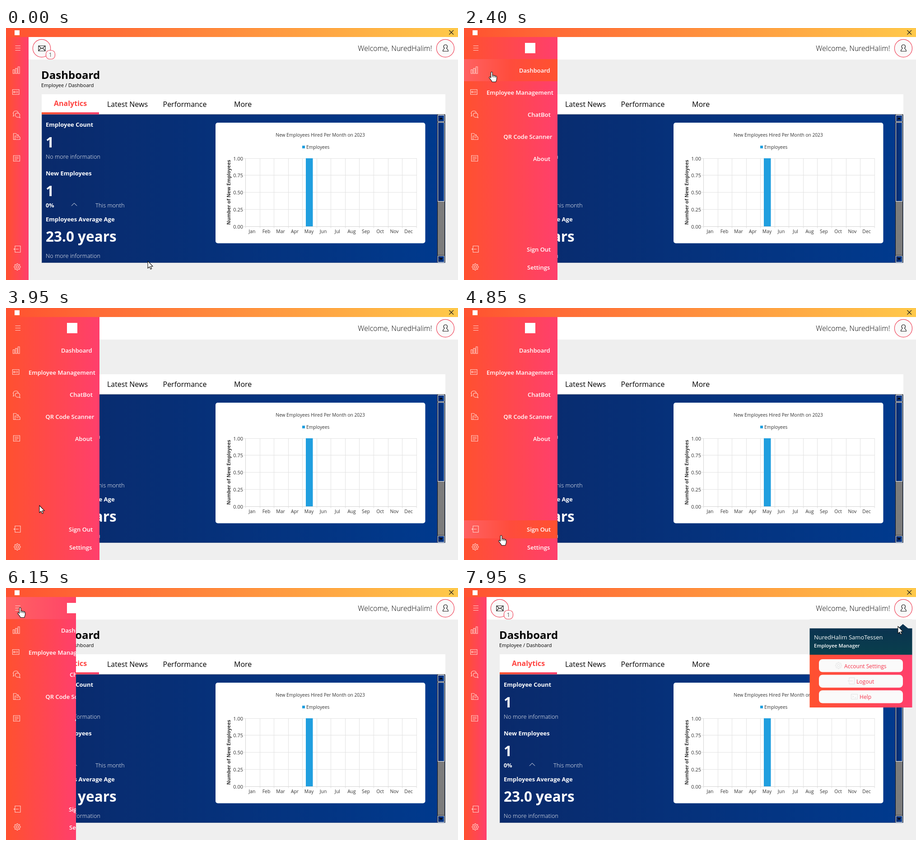
An HTML page for the animation above (8000 ms loop, 1001x559 px).

```html
<!DOCTYPE html>
<html lang="en">
<head>
<meta charset="utf-8">
<title>Dashboard</title>
<style>
  html, body { margin: 0; width: 100%; height: 100%; overflow: hidden; background: #efefef; }
  #stage { display: block; width: 1001px; height: 559px; }
  text { font-family: "Open Sans", "Noto Sans", sans-serif; white-space: pre; }
  .b { font-weight: 700; }
  .light { font-weight: 300; }
  .h { font-size: 13px; font-weight: 700; }
  .n { font-size: 31.5px; font-weight: 700; }
  .s { font-size: 12.8px; font-weight: 300; }
  .tab { font-size: 16px; }
  .menu text { font-size: 13px; font-weight: 600; fill: #fff; }
  .chart { font-size: 10.2px; fill: #333; }
  .icon { fill: none; stroke: #ffd3cc; stroke-width: 1.15; }
  .mid { text-anchor: middle; }
  .end { text-anchor: end; }
  .ring { fill: #fafafa; stroke: #f0455a; stroke-width: 1.2; }
  .dark { fill: none; stroke: #222; stroke-width: 1.2; }
  .faint { fill: none; stroke: #e2e2e2; }
  .scroll rect { fill: url(#knob); stroke: #fff; }
  .btn rect { fill: #fafafa; }
  .btn text { font-size: 12.1px; fill: #f5334a; }
</style>
</head>
<body>
<svg id="stage" viewBox="0 0 1001 559" xmlns="http://www.w3.org/2000/svg">
  <defs>
    <linearGradient id="bar"><stop stop-color="#ff5230"/><stop offset="1" stop-color="#ffc94a"/></linearGradient>
    <linearGradient id="red"><stop stop-color="#ff512f"/><stop offset="1" stop-color="#ff3f6c"/></linearGradient>
    <linearGradient id="glow"><stop stop-color="#ff6262"/><stop offset=".5" stop-color="#ff4c3c"/><stop offset="1" stop-color="#ff5130"/></linearGradient>
    <linearGradient id="glowTop"><stop stop-color="#ff6262"/><stop offset="1" stop-color="#ff4468"/></linearGradient>
    <linearGradient id="blue"><stop stop-color="#0a2a6b"/><stop offset="1" stop-color="#003a8e"/></linearGradient>
    <linearGradient id="knob"><stop stop-color="#0a2a6b"/><stop offset="1" stop-color="#003a8e"/></linearGradient>
    <linearGradient id="teal" x2="0" y2="1"><stop stop-color="#0b3350"/><stop offset="1" stop-color="#083f4c"/></linearGradient>
    <pattern id="dots" width="2" height="2" patternUnits="userSpaceOnUse">
      <rect width="2" height="2" fill="#e8e8e8"/><path d="M0 0h1v1h-1zM1 1h1v1h-1z" fill="#111"/>
    </pattern>
    <g id="gear"><path id="cog"/><circle r="2.7"/></g>
    <path id="exit" d="M-5-3.5V-7H7V7H-5V3.5M3 0H-7.5M-4.5-3L-7.5 0L-4.5 3"/>
  </defs>

  <rect width="1001" height="559" fill="#efefef"/>
  <rect width="1001" height="20" fill="url(#bar)"/>
  <rect x="19" y="5" width="11" height="11" fill="#fff"/>
  <path class="dark" d="M981.5 5L991 14.5M991 5L981.5 14.5"/>

  <rect x="50" y="20" width="951" height="50" fill="#fff"/>
  <circle class="ring" cx="79" cy="45" r="19.7"/>
  <path class="dark" d="M72 39.500H87V51H72ZL79.500 46L87 39.500M72 51L77.500 44.500M87 51L81.500 44.500"/>
  <rect class="ring" x="88.500" y="49.500" width="20" height="19.500" rx="8"/>
  <text class="mid light" x="98.500" y="64" font-size="13">1</text>
  <text class="end light" x="943.500" y="51" font-size="16">Welcome, NuredHalim!</text>
  <circle class="ring" id="profile" cx="973" cy="45" r="19.6"/>
  <path class="dark" d="M971 45C967.500 41.500 969.500 37 973.300 37S979 41.500 975.600 45C976 47 979.500 46.500 979.500 51.500H967.500C967.500 46.500 970.700 47 971 45Z"/>

  <text class="b" x="78" y="113" font-size="24">Dashboard</text>
  <text x="78" y="131" font-size="11">Employee / Dashboard</text>
  <rect x="79" y="147" width="894" height="45" fill="#fff"/>
  <text class="tab b" x="106" y="173" fill="#ff4440">Analytics</text>
  <text class="tab" x="224" y="175">Latest News</text>
  <text class="tab" x="347.500" y="175">Performance</text>
  <text class="tab" x="505" y="175">More</text>
  <path d="M79 191.500H972.500" stroke="#8d939c"/>
  <rect x="79" y="187" width="127" height="4.500" fill="url(#red)"/>
  <rect x="79" y="192" width="893.500" height="329" fill="url(#blue)"/>
  <path d="M79.500 192V520.500H972.500V192" fill="none" stroke="#5a6a8c" stroke-opacity=".7"/>

  <g fill="#fff">
    <text class="h" x="88" y="219">Employee Count</text>
    <text class="n" x="88" y="265">1</text>
    <text class="s" x="88" y="290">No more information</text>
    <text class="h" x="88" y="327">New Employees</text>
    <text class="n" x="88" y="373">1</text>
    <text class="b" x="88" y="398" font-size="12.500">0%</text>
    <path d="M145 394.500L151 388.500L157 394.500" fill="none" stroke="#fff"/>
    <text class="s" x="198" y="398">This month</text>
    <text class="h" x="88" y="429">Employees Average Age</text>
    <text class="n" x="88" y="474">23.0 years</text>
    <text class="s" x="88" y="510">No more information</text>
  </g>

  <rect x="464" y="210" width="464.500" height="267.500" rx="5" fill="#fff"/>
  <g class="chart" id="chart">
    <text class="mid" x="696" y="241">New Employees Hired Per Month on 2023</text>
    <rect x="656" y="261" width="6" height="6" fill="#209fdf"/>
    <text x="665" y="268">Employees</text>
    <text class="mid b" transform="translate(496.500 364.500) rotate(-90)" font-size="10.700">Number of New Employees</text>
    <path id="grid" fill="none" stroke="#e2e2e2"/>
    <path d="M530.500 289V440.500H909" fill="none" stroke="#d2d2d2"/>
    <rect x="664" y="289" width="15.500" height="151" fill="#209fdf"/>
  </g>

  <g class="scroll">
    <rect x="955" y="192" width="17" height="328" style="fill:url(#dots);stroke:none"/>
    <rect x="956.500" y="193.500" width="14" height="14"/>
    <rect x="956.500" y="209.500" width="14" height="175"/>
    <rect x="956.500" y="505.500" width="14" height="14"/>
    <path d="M955.500 192V520M971.500 192V520M956 208.500H971M956 504.500H971" stroke="#111"/>
    <path d="M959.500 202.500h8l-4-4zM959.500 510.500h8l-4 4z"/>
  </g>

  <svg id="side" width="50" height="559">
    <rect y="20" width="100%" height="539" fill="url(#red)"/>
    <rect id="hover" width="100%"/>
    <rect x="135" y="33" width="23" height="23" fill="#fff"/>
    <g class="icon">
      <path d="M20.500 39.500H32M20.500 44.500H32M20.500 49.500H32"/>
      <path d="M15.500 92.500h3.500v8.500h-3.500zM21 89.500h3.500v11.500h-3.500zM26.500 86h3.500v15h-3.500z"/>
      <path d="M14.500 136.500h14.500v11h-14.500zM17 140.500h3v3h-3zM22 140.500h5M22 143.500h5"/>
      <path d="M18.500 194.500L16 195.500L17 192C14.500 188.500 17 184 21.500 184C25 184 27 186 27 188.500M20.500 192.500C20.500 187.500 29 187.500 30.500 192C31 193.500 30.500 194.500 30 195.500L31 199L27.500 197.800C23.500 199 20.500 196 20.500 192.500Z"/>
      <path d="M20 247.500H16.500V234H22L24 236.500H27V239M20 239.500H28L31 242.500V247.500H20ZM22.500 243H28"/>
      <path d="M16.500 283h14v12.500h-14zM19 286.500h9M19 289.500h9M19 292.500h6"/>
      <use href="#exit" x="25" y="490.500"/>
      <use href="#gear" x="25" y="530"/>
    </g>
    <g class="menu">
      <text x="122" y="99">Dashboard</text>
      <text x="50" y="148">Employee Management</text>
      <text x="141" y="197">ChatBot</text>
      <text x="87.500" y="246">QR Code Scanner</text>
      <text x="153" y="295">About</text>
      <text x="139" y="496">Sign Out</text>
      <text x="140" y="535.500">Settings</text>
    </g>
  </svg>

  <g id="popup">
    <rect x="765.500" y="69" width="227" height="21" fill="#f0f0f0"/>
    <path d="M961 90L972 80L984 90Z" fill="#0b3350"/>
    <rect x="765.500" y="89.500" width="227" height="59" fill="url(#teal)"/>
    <text x="775" y="114" font-size="13" fill="#fff">NuredHalim SamoTessen</text>
    <text x="775" y="132" font-size="11" font-weight="600" fill="#fff">Employee Manager</text>
    <rect x="765.500" y="148" width="227" height="117" fill="url(#red)"/>
    <g class="btn">
      <rect x="786" y="158" width="186" height="28.500" rx="8"/>
      <rect x="786" y="192.500" width="186" height="28.500" rx="8"/>
      <rect x="786" y="227" width="186" height="28.500" rx="8"/>
      <text x="842" y="177.500">Account Settings</text>
      <text x="869" y="211.500">Logout</text>
      <text x="876" y="246">Help</text>
      <g class="faint">
        <use href="#gear" x="829.500" y="172"/>
        <use href="#exit" x="858" y="206"/>
        <path d="M857.500 235.500h14v11h-14zM860 239l3 2l-3 2M865 243.500h4"/>
      </g>
    </g>
  </g>

  <g id="cursor" fill="#fff" stroke="#111" stroke-width="1.1" stroke-linejoin="round">
    <path id="arrow" d="M0 0V16L3.700 12.600L6.100 18L8.600 17L6.200 11.800H11.300Z"/>
    <path id="hand" d="M-1.500 1.200C-1.500-1 2-1 2 1.200V7.500C3 6.300 5 6.500 5.300 8C6.500 7 8.300 7.400 8.600 8.900C10 8.200 11.500 9 11.500 10.500V15C11.500 17.500 10 18.500 9.700 21.500H1C.8 19-3.500 15.500-5 12.500C-5.800 10.800-3.800 9.800-2.800 11L-1.500 12.500ZM2 7.500V11M5.300 8V11.500M8.600 9V12"/>
  </g>
</svg>
<script>
const $ = id => document.getElementById(id);
const clamp = v => Math.max(0, Math.min(1, v));
const LOOP = 8000, STEP = 50;

function addText(x, y, cls, size, str) {
  const el = document.createElementNS('http://www.w3.org/2000/svg', 'text');
  el.setAttribute('x', x);
  el.setAttribute('y', y);
  el.setAttribute('class', cls);
  el.setAttribute('font-size', size);
  el.textContent = str;
  $('chart').append(el);
}

// Chart grid with axis labels
let grid = '';
for (let i = 0; i <= 12; i++) grid += `M${Math.round(530 + i * 31.55) + .5} 289V444`;
for (let i = 0; i <= 4; i++) {
  const y = 289 + i * 37.75;
  grid += `M526 ${Math.floor(y) + .5}H909`;
  addText(525, y + 4.5, 'end', 11, (1 - i / 4).toFixed(2));
}
$('grid').setAttribute('d', grid);
'Jan Feb Mar Apr May Jun Jul Aug Sep Oct Nov Dec'.split(' ')
  .forEach((m, i) => addText(545 + i * 31.5, 455, 'mid', 10.4, m));

// Eight-toothed cog
let cog = '';
for (let i = 0; i < 32; i++) {
  const a = (i - .5) * Math.PI / 16, r = i % 4 < 2 ? 7.2 : 5.4;
  cog += (i ? 'L' : 'M') + (r * Math.cos(a)).toFixed(2) + ' ' + (r * Math.sin(a)).toFixed(2);
}
$('cog').setAttribute('d', cog + 'Z');

// Pointer route: time, x, y
const route = [
  [0, 314, 517], [50, 321, 508], [100, 329, 500], [200, 329, 500], [400, 362, 468],
  [700, 250, 300], [1050, 100, 114], [1350, 31, 42], [1750, 31, 42], [2400, 61, 98],
  [2500, 62, 105], [2800, 70, 220], [3100, 72, 380], [3300, 74, 470], [3500, 76, 492],
  [3750, 76, 485], [3950, 74, 438], [4150, 76, 300], [4250, 77, 330], [4500, 80, 520],
  [4700, 82, 532], [4850, 82, 505], [5000, 84, 469], [5250, 90, 290], [5550, 95, 107],
  [5850, 93, 100], [6000, 50, 55], [6100, 31, 44], [6250, 31, 44], [6450, 300, 75],
  [6650, 671, 95], [6700, 733, 125], [6800, 810, 158], [7050, 920, 90], [7250, 970, 46],
  [7550, 968, 53], [7950, 961, 85]
];
const rows = [20, 69, 118, 167, 216, 265].map(y => [y, 49]).concat([[471, 40], [511, 40]]);

function pointer(t) {
  const i = route.findIndex(p => p[0] > t);
  if (i < 0) return route[route.length - 1].slice(1);
  const [t0, x0, y0] = route[i - 1], [t1, x1, y1] = route[i];
  const k = (t - t0) / (t1 - t0);
  return [Math.round(x0 + (x1 - x0) * k), Math.round(y0 + (y1 - y0) * k)];
}

function draw(t) {
  const [x, y] = pointer(t);
  const open = clamp((t - 1600) / 150) - clamp((t - 6100) / 150);
  const width = Math.round(50 + 157 * open);
  const row = x < width && rows.find(([top, h]) => y >= top && y < top + h);
  const onProfile = t < 7550 && Math.hypot(x - 973, y - 45) < 20;

  $('side').setAttribute('width', width);
  const hover = $('hover');
  hover.style.display = row ? '' : 'none';
  if (row) {
    hover.setAttribute('y', row[0]);
    hover.setAttribute('height', row[1]);
    hover.setAttribute('fill', row[0] === 20 ? 'url(#glowTop)' : 'url(#glow)');
  }
  $('profile').style.fill = onProfile ? '#e8e8e8' : '';
  $('popup').style.display = t >= 7600 ? '' : 'none';

  const hand = row || onProfile;
  $('hand').style.display = hand ? '' : 'none';
  $('arrow').style.display = hand ? 'none' : '';
  $('cursor').setAttribute('transform', `translate(${x} ${y})`);
}

const start = performance.now();
function tick() {
  const t = (performance.now() - start) % LOOP;
  draw(Math.floor(t / STEP) * STEP);
  requestAnimationFrame(tick);
}
tick();
</script>
</body>
</html>
```
